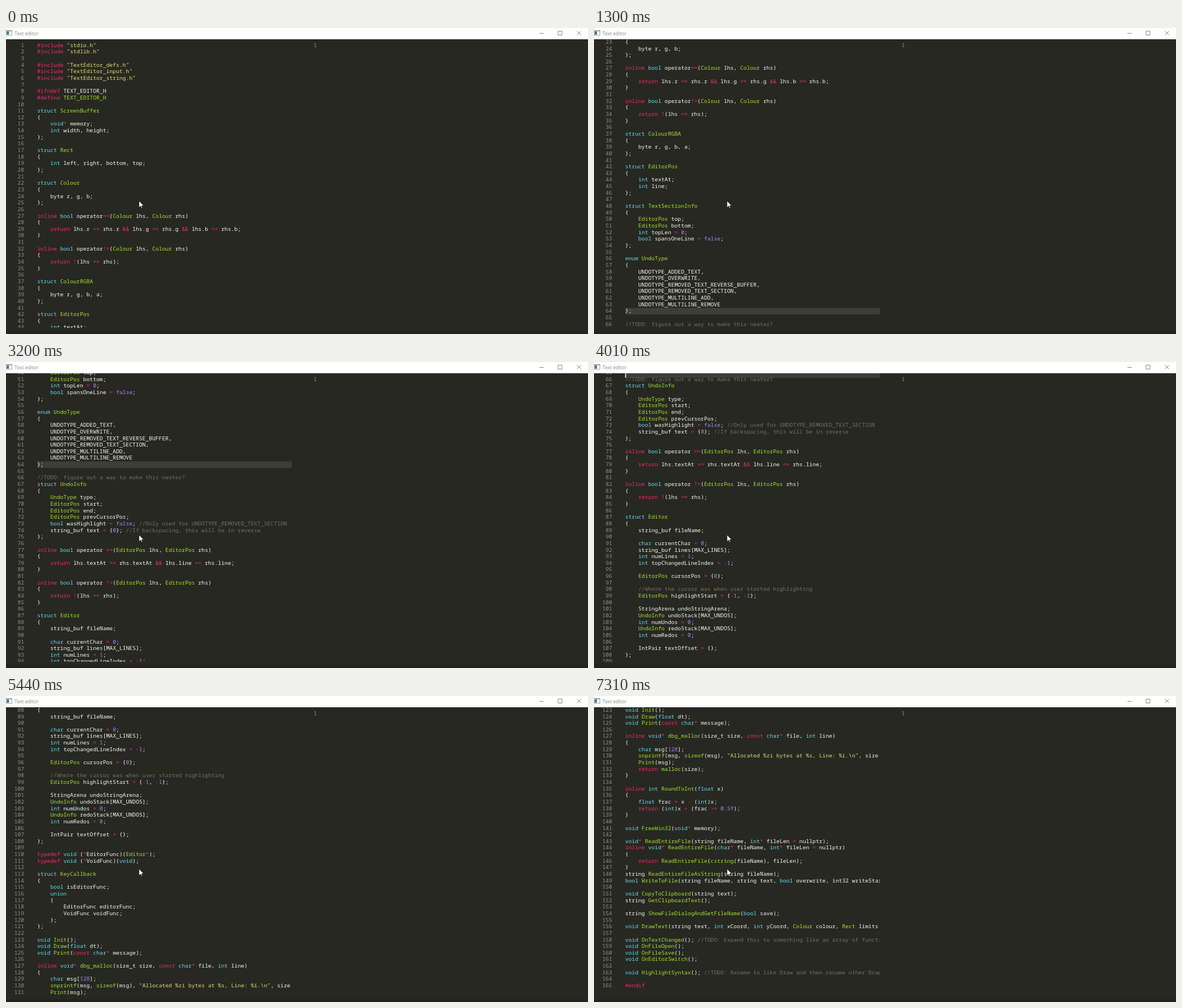
Recreate the animation shown at these times as an HTML page with a canvas. Size 1031 by 543 pixels, loop 7.71 s.

```html
<!DOCTYPE html>
<html lang="en">
<head>
<meta charset="utf-8">
<title>Text editor</title>
<style>
  html, body { margin: 0; width: 100%; height: 100%; overflow: hidden; background: #272822; }
  canvas { display: block; }
</style>
</head>
<body>
<canvas id="stage" width="1031" height="543"></canvas>
<script>
const source = String.raw`#include "stdio.h"
#include "stdlib.h"

#include "TextEditor_defs.h"
#include "TextEditor_input.h"
#include "TextEditor_string.h"

#ifndef TEXT_EDITOR_H
#define TEXT_EDITOR_H

struct ScreenBuffer
{
    void* memory;
    int width, height;
};

struct Rect
{
    int left, right, bottom, top;
};

struct Colour
{
    byte r, g, b;
};

inline bool operator==(Colour lhs, Colour rhs)
{
    return lhs.r == rhs.r && lhs.g == rhs.g && lhs.b == rhs.b;
}

inline bool operator!=(Colour lhs, Colour rhs)
{
    return !(lhs == rhs);
}

struct ColourRGBA
{
    byte r, g, b, a;
};

struct EditorPos
{
    int textAt;
    int line;
};

struct TextSectionInfo
{
    EditorPos top;
    EditorPos bottom;
    int topLen = 0;
    bool spansOneLine = false;
};

enum UndoType
{
    UNDOTYPE_ADDED_TEXT,
    UNDOTYPE_OVERWRITE,
    UNDOTYPE_REMOVED_TEXT_REVERSE_BUFFER,
    UNDOTYPE_REMOVED_TEXT_SECTION,
    UNDOTYPE_MULTILINE_ADD,
    UNDOTYPE_MULTILINE_REMOVE
};

//TODO: figure out a way to make this neater?
struct UndoInfo
{
    UndoType type;
    EditorPos start;
    EditorPos end;
    EditorPos prevCursorPos;
    bool wasHighlight = false; //Only used for UNDOTYPE_REMOVED_TEXT_SECTION
    string_buf text = {0}; //If backspacing, this will be in reverse
};

inline bool operator ==(EditorPos lhs, EditorPos rhs)
{
    return lhs.textAt == rhs.textAt && lhs.line == rhs.line;
}

inline bool operator !=(EditorPos lhs, EditorPos rhs)
{
    return !(lhs == rhs);
}

struct Editor
{
    string_buf fileName;

    char currentChar = 0;
    string_buf lines[MAX_LINES];
    int numLines = 1;
    int topChangedLineIndex = -1;

    EditorPos cursorPos = {0};

    //Where the cursor was when user started highlighting
    EditorPos highlightStart = {-1, -1};

    StringArena undoStringArena;
    UndoInfo undoStack[MAX_UNDOS];
    int numUndos = 0;
    UndoInfo redoStack[MAX_UNDOS];
    int numRedos = 0;

    IntPair textOffset = {};
};

typedef void (*EditorFunc)(Editor*);
typedef void (*VoidFunc)(void);

struct KeyCallback
{
    bool isEditorFunc;
    union
    {
        EditorFunc editorFunc;
        VoidFunc voidFunc;
    };
};

void Init();
void Draw(float dt);
void Print(const char* message);

inline void* dbg_malloc(size_t size, const char* file, int line)
{
    char msg[128];
    snprintf(msg, sizeof(msg), "Allocated %zi bytes at %s, Line: %i.\n", size
    Print(msg);
    return malloc(size);
}

inline int RoundToInt(float x)
{
    float frac = x - (int)x;
    return (int)x + (frac >= 0.5f);
}

void FreeWin32(void* memory);

void* ReadEntireFile(string fileName, int* fileLen = nullptr);
inline void* ReadEntireFile(char* fileName, int* fileLen = nullptr)
{
    return ReadEntireFile(cstring(fileName), fileLen);
}
string ReadEntireFileAsString(string fileName);
bool WriteToFile(string fileName, string text, bool overwrite, int32 writeStart

void CopyToClipboard(string text);
string GetClipboardText();

string ShowFileDialogAndGetFileName(bool save);

void DrawText(string text, int xCoord, int yCoord, Colour colour, Rect limits

void OnTextChanged(); //TODO: Expand this to something like an array of functions
void OnFileOpen();
void OnFileSave();
void OnEditorSwitch();

void HighlightSyntax(); //TODO: Rename to like Draw and then rename other Draw

#endif`;

const COLOR = {
  back: '#272822', plain: '#f8f8f2', pink: '#f92672', cyan: '#66d9ef', green: '#a6e22e',
  yellow: '#e6db74', purple: '#ae81ff', comment: '#75715e', number: '#90908a', bar: '#3e3e38'
};
const TYPE_WORDS = /^(struct|enum|union|void|int|bool|char|float)$/;
const KEYWORDS = /^(typedef|inline|return|const)$/;
const declared = new Set([...source.matchAll(/(?:struct|enum) (\w+)/g)].map(m => m[1]));

function wordColor(word, line, end) {
  if (TYPE_WORDS.test(word)) return COLOR.cyan;
  if (KEYWORDS.test(word)) return COLOR.pink;
  if (word === 'false') return COLOR.purple;
  const named = declared.has(word) || line[end] === '(' || line.startsWith('#define');
  return named ? COLOR.green : COLOR.plain;
}

function tokenize(line) {
  const pattern = /(\/\/.*)|("[^"]*")|(#\w+|[=!&*+<>-]+)|([A-Za-z_]\w*)|(\d[\w.]*)|[^\s\w]/g;
  return [...line.matchAll(pattern)].map(m => {
    const [text, comment, string, symbol, word, digits] = m;
    const color = comment ? COLOR.comment : string ? COLOR.yellow : symbol ? COLOR.pink
      : word ? wordColor(word, line, m.index + text.length) : digits ? COLOR.purple : COLOR.plain;
    return { text, color, column: m.index };
  });
}
const lines = source.split('\n').map(tokenize);

// Text sits on a grid of 8 x 16 cells, shown at a reduced scale.
const SCALE = 0.7279, CELL = 8 * SCALE, ROW = 16 * SCALE;
const TOP = 25, TEXT_X = 55.2, NUMBER_RIGHT = 32.2, PANE_RIGHT = 506;
const CURSOR_LINE = 63, LOOP = 7710, LINES_PER_TICK = 2.5;

// Wheel bursts: first change, last change, number of changes, wheel ticks
const bursts = [
  [70, 420, 6, 5], [950, 1300, 6, 4], [1700, 2180, 7, 5], [2450, 2800, 6, 5], [3200, 3750, 8, 6],
  [4010, 4220, 4, 4], [4690, 4970, 5, 5], [5440, 5770, 5, 5], [6170, 6510, 5, 5], [6970, 7310, 5, 5]
];

function scrollAt(time) {
  let ticks = 0;
  for (const [first, last, steps, count] of bursts) {
    if (time < first) break;
    const done = Math.min(steps, 1 + Math.floor((time - first) / (last - first) * (steps - 1) + 1e-6));
    ticks += Math.ceil(done / steps * count);
  }
  return ticks * LINES_PER_TICK;
}

const ctx = document.getElementById('stage').getContext('2d', { alpha: false });

function rect(color, x, y, w, h) {
  ctx.fillStyle = color;
  ctx.fillRect(x, y, w, h);
}

function code(text, x, rowTop, color) {
  ctx.save();
  ctx.translate(x, rowTop + 8.7);
  ctx.scale(SCALE, SCALE);
  ctx.font = '13.3333px "Noto Sans Mono", monospace';
  ctx.fillStyle = color;
  ctx.fillText(text, 0, 0);
  ctx.restore();
}

function lineNumber(n, right, rowTop) {
  const label = String(n);
  code(label, right - label.length * CELL, rowTop, COLOR.number);
}

function drawTitleBar() {
  rect('#fff', 0, 0, 1031, 20);
  rect('#8a8f94', 0, 4, 11, 9.5);
  rect('#f4f6f7', 0.8, 5.6, 9.4, 7.1);
  rect('#2f6f78', 1.5, 6.2, 3.6, 5.6);
  ctx.font = '8.5px "Open Sans", sans-serif';
  ctx.fillStyle = '#858585';
  ctx.fillText('Text editor', 15.3, 12.6);
  ctx.strokeStyle = '#777';
  ctx.lineWidth = 0.9;
  ctx.beginPath();
  ctx.moveTo(945, 9.5); ctx.lineTo(952.5, 9.5);
  ctx.rect(978, 5.5, 7, 7);
  ctx.moveTo(1011.5, 5.5); ctx.lineTo(1018.5, 12.5);
  ctx.moveTo(1018.5, 5.5); ctx.lineTo(1011.5, 12.5);
  ctx.stroke();
}

function drawCurrentLine(scroll) {
  const y = TOP + (CURSOR_LINE - scroll) * ROW;
  if (y > 20 - ROW && y < 532) {
    rect(COLOR.bar, TEXT_X, Math.max(y, 20), PANE_RIGHT - TEXT_X, Math.min(y + ROW, 538) - Math.max(y, 20));
  }
  // Just past the top edge, the bar and caret stick to it.
  if (scroll === 65) {
    rect(COLOR.bar, TEXT_X, 20, PANE_RIGHT - TEXT_X, 8);
    rect(COLOR.plain, TEXT_X, 20, 1.5, 8);
  }
}

function drawText(scroll) {
  ctx.save();
  ctx.beginPath();
  ctx.rect(0, 20, PANE_RIGHT, 512);
  ctx.clip();
  lines.forEach((tokens, i) => {
    const y = TOP + (i - scroll) * ROW;
    if (y < 20 - ROW || y > 532) return;
    lineNumber(i + 1, NUMBER_RIGHT, y);
    for (const t of tokens) code(t.text, TEXT_X + t.column * CELL, y, t.color);
  });
  ctx.restore();
}

function drawPointer() {
  const arrow = new Path2D('M0 0V17L4 13.2 6.6 19 9 18 6.5 12.3H12Z');
  ctx.save();
  ctx.translate(235.6, 306.8);
  ctx.scale(0.7, 0.7);
  ctx.fillStyle = '#fff';
  ctx.strokeStyle = '#000';
  ctx.lineWidth = 1;
  ctx.fill(arrow);
  ctx.stroke(arrow);
  ctx.restore();
}

function draw(now) {
  const scroll = scrollAt(now % LOOP);
  rect(COLOR.back, 0, 0, 1031, 543);
  rect('#22231d', 0, 538, 1031, 5);
  drawCurrentLine(scroll);
  drawText(scroll);
  lineNumber(1, 550.5, TOP);
  drawTitleBar();
  drawPointer();
}

const start = performance.now();
function tick() {
  draw(performance.now() - start);
  requestAnimationFrame(tick);
}
tick();
</script>
</body>
</html>
```
